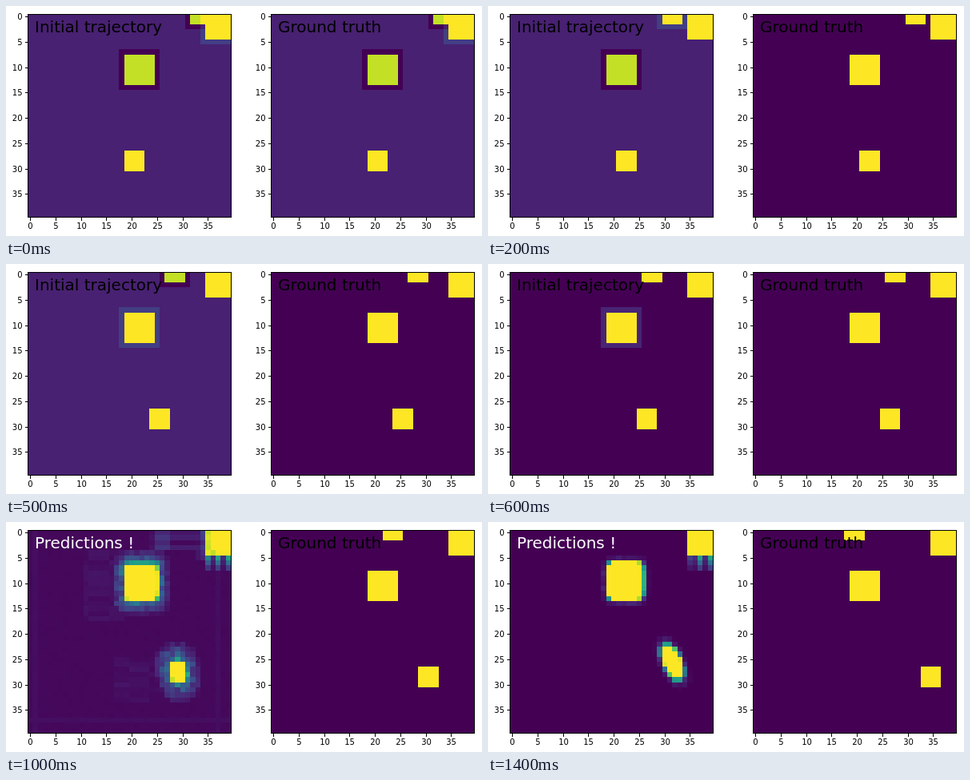
Animation, 595 px wide and 288 px high, one loop 1.5 s. Source, as an HTML page:

```html
<!DOCTYPE html>
<html lang="en">
<head>
<meta charset="utf-8">
<title>Moving squares: prediction and truth</title>
<style>
html, body { margin: 0; width: 100%; height: 100%; overflow: hidden; background: #fff; }
svg { display: block; }
text { font-family: "DejaVu Sans", sans-serif; font-size: 10px; }
.title { font-size: 20px; }
.axis { fill: none; stroke: #000; stroke-width: 1; shape-rendering: crispEdges; }
.cells { shape-rendering: crispEdges; }
</style>
</head>
<body>
<svg id="stage" width="595" height="288" viewBox="0 0 595 288"></svg>
<script>
const N = 40, CELL = 6.35, TOP = 10.5, STEP = 100, STEPS = 15, FIRST_GUESS = 7;
const stage = document.getElementById('stage');
const clamp = (v, lo = 0, hi = 1) => Math.min(hi, Math.max(lo, v));
const mix = (a, b, k) => a + (b - a) * k;

function add(parent, tag, attrs, text) {
  const el = document.createElementNS('http://www.w3.org/2000/svg', tag);
  for (const name in attrs) el.setAttribute(name, attrs[name]);
  if (text !== undefined) el.textContent = text;
  return parent.appendChild(el);
}

// Viridis colour map
const stops = ['440154', '482475', '414487', '355f8d', '2a788e', '21918c',
  '22a884', '44bf70', '7ad151', 'bddf26', 'fde725']
  .map(h => [0, 2, 4].map(i => parseInt(h.slice(i, i + 2), 16)));
function viridis(v) {
  const p = clamp(v) * 10, i = Math.min(9, Math.floor(p));
  return `rgb(${stops[i].map((c, k) => Math.round(mix(c, stops[i + 1][k], p - i)))})`;
}

function makePanel(left) {
  const edgeX = c => Math.floor(left + c * CELL);
  const edgeY = r => Math.floor(TOP + r * CELL);
  const group = add(stage, 'g', { class: 'cells' });
  const cells = [];
  for (let r = 0; r < N; r++) for (let c = 0; c < N; c++) {
    const x = edgeX(c), y = edgeY(r);
    cells.push(add(group, 'rect', { x, y, width: edgeX(c + 1) - x, height: edgeY(r + 1) - y }));
  }
  const size = N * CELL, bottom = TOP + size;
  add(stage, 'rect', { class: 'axis', x: left, y: TOP, width: size, height: size });
  for (let n = 0; n < N; n += 5) {
    const x = left + (n + .5) * CELL, y = TOP + (n + .5) * CELL;
    const tx = Math.floor(x) + .5, ty = Math.floor(y) + .5;
    add(stage, 'path', { class: 'axis', d: `M${tx} ${bottom}v4M${left} ${ty}h-4` });
    add(stage, 'text', { x: tx, y: 279, 'text-anchor': 'middle' }, n);
    add(stage, 'text', { x: left - 7, y: Math.round(y + 3.4), 'text-anchor': 'end' }, n);
  }
  const title = add(stage, 'text', { class: 'title', x: left + 8.5, y: 33 });
  return { cells, title };
}

function paint(panel, field, label, ink) {
  panel.cells.forEach((el, i) => el.setAttribute('fill', viridis(field[i])));
  panel.title.textContent = label;
  panel.title.setAttribute('fill', ink);
}

// Squares: [column, row, width, height] at a given step
const squares = s => [[35, 0, 5, 5], [32 - s, 0, 4, 2], [19, 8, 6, 6], [19 + s, 27, 4, 4]];

// Sign of the rim noise for each square, by step
const rims = [[1, -1, -1, 0], [0, 1, -1, 0], [0, 1, -1, 0], [0, 1, 0, 1],
  [0, 1, 0, 1], [0, -1, 1, 0], [0, 0, 1, 0]];

function movie(s, noise) {
  const field = new Array(N * N).fill(0);
  const bump = (x, y, w, h, v) => {
    for (let r = Math.max(0, y); r < Math.min(N, y + h); r++)
      for (let c = Math.max(0, x); c < Math.min(N, x + w); c++) field[r * N + c] += v;
  };
  squares(s).forEach(([x, y, w, h], i) => {
    bump(x, y, w, h, 1);
    if (noise && noise[i]) bump(x - 1, y - 1, w + 2, h + 2, noise[i] * .1);
  });
  const low = field.reduce((a, b) => Math.min(a, b), 0);
  return field.map(v => (Math.min(v, 1) - low) / (1 - low));
}

function hash(c, r, s) {
  const v = Math.sin(c * 12.99 + r * 78.23 + s * 37.7) * 43758.55;
  return v - Math.floor(v);
}

// Blob keys: step, cx, cy, half width, half height, power, tilt, halo, halo width
const midKeys = [
  [7, 21.5, 10.5, 3, 3, 9, 0, .4, 2],
  [8, 21.5, 10.5, 3, 3, 9, 0, .55, 3],
  [12, 22.2, 9.2, 4, 4.8, 3, 0, .42, 1.8],
  [14, 22.3, 9.5, 3.8, 4, 5, 0, .2, 1]];
const lowKeys = [
  [7, 27.5, 28.5, 2, 2, 6, 0, .4, 2],
  [8, 27.9, 28.4, 1.8, 2, 3, 0, .55, 4],
  [12, 30.3, 26.5, 2, 3, 2, .42, .35, 2],
  [14, 31.5, 25.5, 1.9, 3.9, 2.2, .42, .15, 1]];

function keyAt(keys, s) {
  const i = Math.max(1, keys.findIndex(k => k[0] >= s));
  const a = keys[i - 1], b = keys[i], k = (s - a[0]) / (b[0] - a[0]);
  return a.map((v, j) => mix(v, b[j], k));
}

function blob(c, r, s, [, cx, cy, a, b, power, tilt, halo, width]) {
  const dx = c - cx, dy = r - cy, co = Math.cos(tilt), si = Math.sin(tilt);
  const u = Math.abs(dx * co - dy * si) / a, v = Math.abs(dx * si + dy * co) / b;
  const dist = (1 - Math.pow(u ** power + v ** power, 1 / power)) * Math.min(a, b);
  const body = clamp(.5 + dist * 1.4);
  const glow = dist < 0 ? halo * (.4 + .6 * hash(c, r, s)) * clamp(1 + dist / width) : 0;
  return Math.max(body, glow);
}

// Corner square with a ragged lower edge
function corner(c, r, s) {
  const fade = clamp((14 - s) / 6);
  if (c >= 35 && r < 5) return 1 - (c === 35 || r === 4 ? .16 * fade * hash(c, r, s) : 0);
  if (c >= 35 && r < 8) return (c % 2 ? .55 : .12) * (1 - (r - 5) / 3) * (c === 35 ? .35 + .65 * fade : 1);
  if (c >= 33 && r < 6) return (c === 34 ? .45 : .15) * fade * fade * (.4 + .6 * hash(c, r, s));
  return 0;
}

// Dissolving remains of the top square
function smear(c, r, s) {
  const left = 35 - s, fade = clamp((11 - s) / 3);
  if (r > 3 || c < left - 1 || c > 34) return 0;
  const ridge = r % 2 ? 1 : .7;
  const along = c < left ? .35 : c < left + 3 ? 1 : .55;
  return .45 * fade * ridge * along * (r === 2 && c > left + 2 ? .35 : 1);
}

function haze(c, r, s) {
  const fade = clamp((14 - s) / 5);
  let v = .022 + .006 * hash(c, r, 0);
  if (c === 1 || c === 37 || r === 37) v += .02;
  const nearMid = c > 10 && c < 19 && Math.abs(r - 10.5) < 7;
  const nearLow = c > 16 && c < s + 18 && Math.abs(r - 29) < 4.5;
  if (nearMid || nearLow) v += .045 * hash(c >> 2, r, s);
  return v * fade;
}

function predict(s) {
  const mid = keyAt(midKeys, s), low = keyAt(lowKeys, s);
  return Array.from({ length: N * N }, (_, i) => {
    const c = i % N, r = Math.floor(i / N);
    return Math.max(haze(c, r, s), corner(c, r, s), smear(c, r, s),
      blob(c, r, s, mid), blob(c, r, s, low));
  });
}

const guess = makePanel(27.5), truth = makePanel(331.5);
let shown = -1;

function draw(ms) {
  let s = Math.floor(ms / STEP) % STEPS;
  if (s === 3) s = 4;
  if (s === shown) return;
  shown = s;
  if (s < FIRST_GUESS) paint(guess, movie(s, rims[s]), 'Initial trajectory', '#000');
  else paint(guess, predict(s), 'Predictions !', '#fff');
  paint(truth, movie(s, s < 2 ? rims[s] : null), 'Ground truth', '#000');
}

const start = performance.now();
function tick() {
  draw(performance.now() - start);
  requestAnimationFrame(tick);
}
tick();
</script>
</body>
</html>
```
